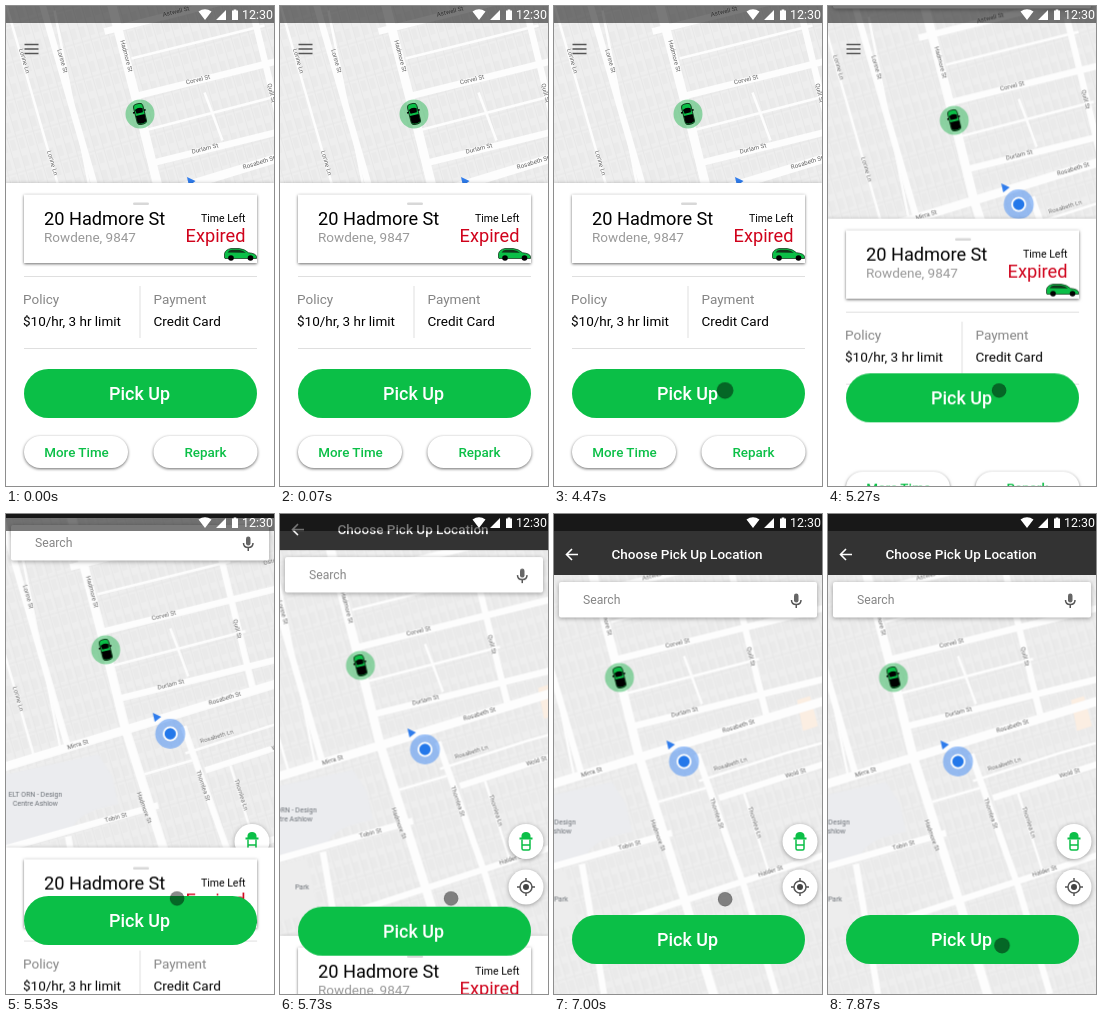
Write an HTML page that moves like this. It is 268 px wide and 480 px high and loops after 8 s.

```html
<!DOCTYPE html>
<html lang="en">
<head>
<meta charset="utf-8">
<title>Parking pick up</title>
<style>
html, body { margin: 0; width: 100%; height: 100%; overflow: hidden; background: #fff; }
svg { display: block; width: 268px; height: 480px; font-family: Roboto, Arial, sans-serif; }

.slide { animation: slide 8s infinite; }
.map { --from: 68.5px, -55.5px; --to: 0px, 0px; }
.sheet { --from: 0px, 0px; --to: 0px, 313px; }
.pick { --from: 0px, 0px; --to: 0px, 38px; }
.top { --from: 0px, -114px; --to: 0px, 0px; }
@keyframes slide {
  0%, 64.5% { transform: translate(var(--from)); animation-timing-function: cubic-bezier(.3, .2, .6, .91); }
  75.25%, 100% { transform: translate(var(--to)); }
}

.menu { animation: fade 8s linear infinite; }
@keyframes fade {
  0%, 65.8% { opacity: 1; }
  68.2%, 100% { opacity: 0; }
}

.pointer { animation: point 8s infinite; }
@keyframes point {
  0%, 44% { transform: translate(246px, 334px); opacity: 0; animation-timing-function: step-end; }
  44.1% { transform: translate(246px, 334px); opacity: 1; animation-timing-function: ease-in-out; }
  54.125%, 86.6% { transform: translate(171px, 384.5px); opacity: 1; animation-timing-function: ease-in-out; }
  96.6%, 100% { transform: translate(174px, 431.5px); opacity: 1; }
}
.dot { animation: press 8s infinite; }
@keyframes press {
  0%, 54.8% { transform: scale(1); }
  56.2% { transform: scale(1.15); }
  57.5%, 97.3% { transform: scale(1); }
  98.4%, 100% { transform: scale(1.08); }
}

.road { fill: none; stroke: #fdfdfd; stroke-width: 6.5; }
.wide { stroke-width: 9; }
.lane { stroke-width: 2.5; }
.names { font-size: 6.2px; fill: #606060; text-anchor: middle; stroke: #fff; stroke-width: 1; paint-order: stroke; }
.body { font-size: 13.5px; }
.soft { fill: #999; }
.mid { fill: #858585; }
.rule { stroke: #dfdfdf; }
.green { fill: #0bbf47; }
.lift { filter: drop-shadow(0 1px 1.8px rgba(0, 0, 0, .58)); }
.float { filter: drop-shadow(0 1px 2px rgba(0, 0, 0, .35)); }
.line { fill: none; stroke: #555; stroke-width: 1.5; }
</style>
</head>
<body>
<svg viewBox="0 0 268 480">
  <defs>
    <pattern id="lots" width="9" height="36" patternUnits="userSpaceOnUse" patternTransform="rotate(-16)">
      <path d="M0 0H9V36H0Z" fill="#eee"/>
      <path d="M1 3H6V14H1ZM2 21H7V32H2Z" fill="#eaeaea"/>
      <path d="M.5 0V36M0 18H9" stroke="#e4e4e4" stroke-width=".8"/>
    </pattern>
  </defs>

  <g class="slide map">
    <rect x="-80" y="-10" width="360" height="500" fill="url(#lots)"/>
    <path d="M-80 298L58 268L72 290L78 318Q40 324 32 342L-80 372Z" fill="#ebecef"/>
    <path d="M-80 378L12 356L24 410L-80 436Z" fill="#ededed"/>
    <path d="M243 186L256 182L264 212L249 217Z" fill="#fbeee2"/>
    <g class="road lane">
      <path d="M-78 20L-6 271M70 180L205 145M57 108L190 75M145 267L232 239L268 229M190 279L216 362M104 288L152 274M20 262L-20 60M130 142L148 190"/>
    </g>
    <g class="road">
      <path d="M-42 20L28 262M30 81L270 21M60 146L270 94M76 213L270 165M178 60L213 204M165 284L270 250M143 240L190 372M-80 375L118 319M40 416L270 341M28 350L50 480M190 372L222 480"/>
    </g>
    <g class="road wide">
      <path d="M27 15L65.5 163.5L85 242L132 390L160 482M-80 294L38 258L270 187"/>
    </g>
    <g class="names" id="names"></g>
    <g fill="#6d7278" font-size="7" text-anchor="middle">
      <text x="-5" y="310">ELT ORN - Design</text>
      <text x="-5" y="319">Centre Ashlow</text>
      <text x="7" y="387.5">Park</text>
    </g>

    <g transform="translate(65.5 163.5)">
      <circle r="14.5" fill="#32b95c" fill-opacity=".52"/>
      <g transform="rotate(-14)">
        <rect class="green" x="-4.8" y="-10.5" width="9.6" height="21" rx="3.2" stroke="#0a2a12" stroke-width=".8"/>
        <path d="M-4 -5Q0 -7.5 4 -5L3.2 -1H-3.2ZM-6.5 -3.5h2v1.5h-2zM4.500 -3.5h2v1.5h-2z"/>
        <path d="M-4.500 1H4.500V8.500Q0 11 -4.500 8.500Z"/>
      </g>
    </g>

    <path d="M112.5 226.5L121 230.5L114.5 235.5Z" fill="#2f7cec"/>
    <circle cx="130" cy="247.5" r="15" fill="#4c8ff2" fill-opacity=".55"/>
    <circle cx="130" cy="247.5" r="7.5" fill="#fff"/>
    <circle cx="130" cy="247.5" r="5.7" fill="#2478ea"/>
  </g>

  <path class="menu" d="M18.500 38.500H32.500M18.500 43H32.500M18.500 47.500H32.500" stroke="#555" stroke-width="1.5"/>

  <g class="float" fill="#fff">
    <circle cx="246" cy="327.5" r="17.5"/>
    <circle cx="246" cy="373" r="17.5"/>
  </g>
  <g transform="translate(246 327.5)">
    <path class="green" d="M-4.500 -2.500V-6Q-4 -9.500 0 -9.500T4.500 -6V-2.500ZM-6.500 -4H6.500V-2H-6.500Z"/>
    <path d="M-4 -2V7Q-4 8.500 -2.500 8.500H2.500Q4 8.500 4 7V-2M-4 3.500H4" fill="none" stroke="#0bbf47" stroke-width="1.5"/>
  </g>
  <g transform="translate(246 373)">
    <circle class="line" r="6"/>
    <circle r="3" fill="#444"/>
    <path class="line" d="M0 -9V-6M0 6V9M-9 0H-6M6 0H9"/>
  </g>

  <g class="slide top">
    <rect y="-20" width="268" height="81" fill="#333"/>
    <path d="M24 40.500H13M18 35L12.500 40.500L18 46" fill="none" stroke="#fff" stroke-width="1.6"/>
    <text x="57.500" y="44.700" font-size="13.5" font-weight="500" fill="#fff">Choose Pick Up Location</text>
    <rect class="float" x="5" y="68" width="258" height="35.5" rx="2" fill="#fff"/>
    <text class="mid" x="29" y="90" font-size="12.2">Search</text>
    <rect x="240" y="79.500" width="4.5" height="9" rx="2.25" fill="#666"/>
    <path class="line" d="M237.500 86Q237.500 90.500 242.250 90.500T247 86M242.250 90.500V94"/>
  </g>

  <g class="slide sheet">
    <rect class="float" y="177" width="268" height="330" fill="#fff"/>
    <rect class="lift" x="18" y="188.5" width="233" height="68.5" fill="#fff"/>
    <rect x="127" y="196.5" width="16" height="2.5" rx="1.25" fill="#d8d8d8"/>
    <text x="38" y="218.5" font-size="18.2">20 Hadmore St</text>
    <text class="body soft" x="38" y="235.7">Rowdene, 9847</text>
    <g text-anchor="end">
      <text x="239.5" y="216" font-size="10.5">Time Left</text>
      <text x="239.5" y="236" font-size="18.2" fill="#d0021b">Expired</text>
    </g>
    <path class="green" d="M218.500 252V247.500Q219.500 243.500 225 242.500H233Q238.500 243 242.500 246.700Q250 247.500 250.500 250.500V252.500H219Z" stroke="#0b2a12" stroke-width=".7"/>
    <path d="M221.500 246.500Q223 244 226 243.800H232.500Q237 244.300 240 246.800Z" fill="#10351a"/>
    <circle cx="225" cy="252" r="2.8"/>
    <circle cx="244.5" cy="252" r="2.8"/>
    <path class="rule" d="M18 270.500H251M18 342.500H251M134 280V332"/>
    <g class="body">
      <text class="mid" x="17" y="297.5">Policy</text>
      <text class="mid" x="147.5" y="297.5">Payment</text>
      <text x="17" y="320">$10/hr, 3 hr limit</text>
      <text x="147.5" y="320">Credit Card</text>
    </g>
    <g class="lift" fill="#fff">
      <rect x="18" y="430" width="104" height="32" rx="16"/>
      <rect x="147.5" y="430" width="104" height="32" rx="16"/>
    </g>
    <g class="green" font-size="13.4" font-weight="500" text-anchor="middle">
      <text x="70.5" y="450.7">More Time</text>
      <text x="199.5" y="450.7">Repark</text>
    </g>
  </g>

  <g class="slide pick">
    <rect class="green" x="18" y="363" width="233" height="49" rx="24.5"/>
    <text x="133.5" y="394" font-size="17.9" font-weight="500" fill="#fff" text-anchor="middle">Pick Up</text>
  </g>

  <rect width="268" height="17" fill="#000" fill-opacity=".52"/>
  <g fill="#fff">
    <path d="M199 14L192.500 5.500Q199 .8 205.500 5.500ZM210 14L220 4V14ZM226 4.500H227.700V3.500H230.300V4.500H232V14H226Z"/>
    <text x="236" y="13.3" font-size="12.4">12:30</text>
  </g>

  <g class="pointer">
    <g class="dot">
      <circle r="7.2" fill-opacity=".46"/>
      <circle r="6.8" fill="none" stroke="#000" stroke-opacity=".15" stroke-width=".8"/>
    </g>
  </g>
</svg>
<script>
// name, x, y, angle
const streets = [
  ["Hadmore St", 50, 106, 75], ["Hadmore St", 102, 322, 70],
  ["Corvel St", 124, 131, -14], ["Durlam St", 131, 200, -14],
  ["Rosabeth St", 185, 214, -17], ["Rosabeth Ln", 177, 252, -17],
  ["Mirra St", 38, 260, -17], ["Tobin St", 76, 333, -15],
  ["Wold St", 242, 261, -17], ["Halder St", 217, 359, -18],
  ["Thornlea St", 161, 300, 71], ["Thornlea Ln", 199, 309, 72],
  ["Quill St", 195, 143, 76], ["Astwell St", 102, 63, -14],
  ["Ostrel St", 235, 76, -14],
  ["Lorine Ln", -52, 111, 74], ["Lorine Ln", -24, 213, 74],
  ["Lorine St", -14, 111, 74]
];
const names = document.getElementById("names");
for (const [name, x, y, angle] of streets) {
  const label = document.createElementNS("http://www.w3.org/2000/svg", "text");
  label.setAttribute("transform", `translate(${x} ${y}) rotate(${angle})`);
  label.textContent = name;
  names.append(label);
}
</script>
</body>
</html>
```
